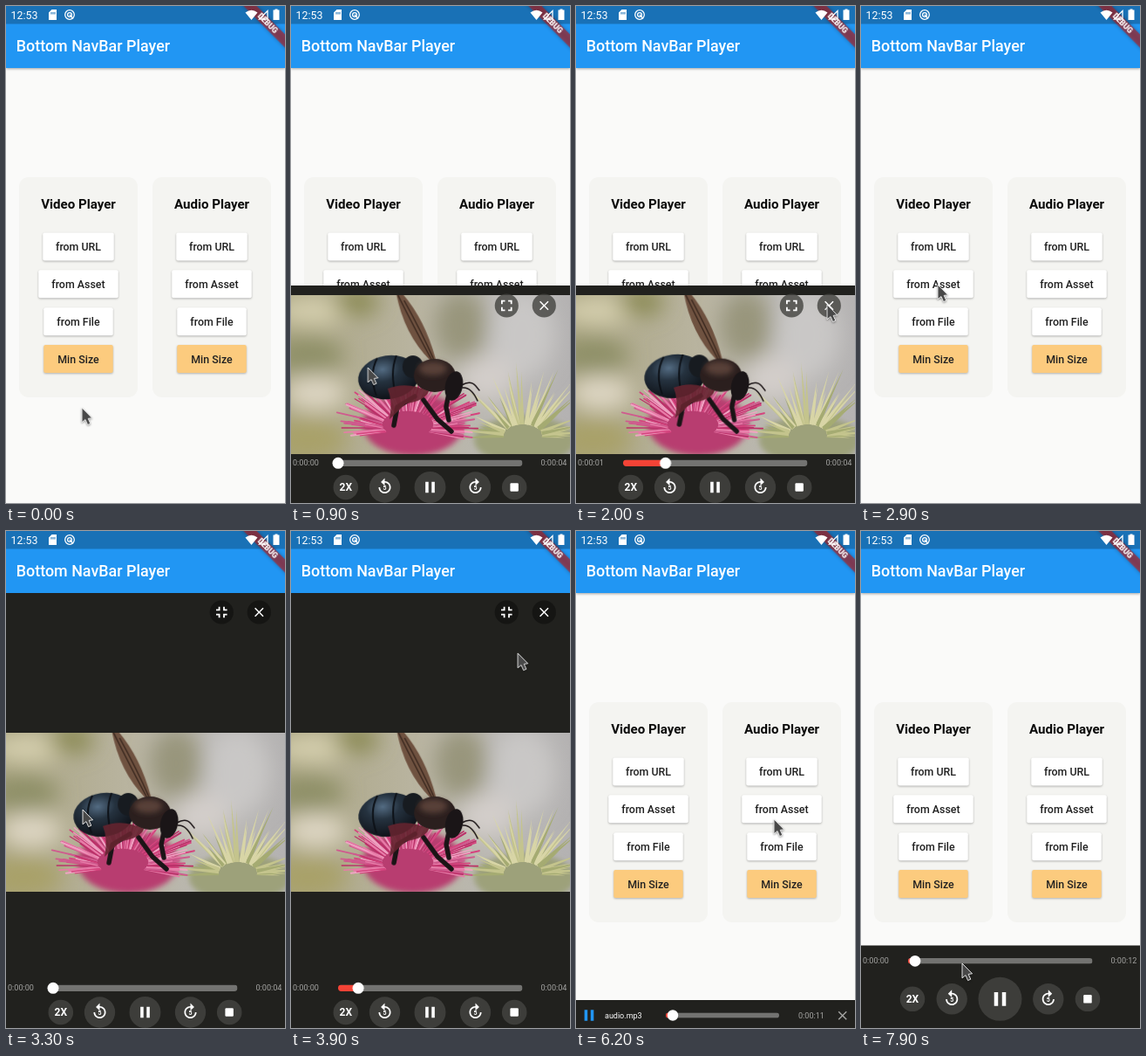
An HTML page for the animation above (8 s loop, 320x569 px).

```html
<!DOCTYPE html>
<html lang="en">
<head>
<meta charset="utf-8">
<title>Bottom NavBar Player</title>
<style>
html, body { margin: 0; width: 100%; height: 100%; overflow: hidden; background: #fafaf9; }
svg { display: block; width: 100vw; height: 100vh; font-family: Roboto, sans-serif; }
.mid { text-anchor: middle; }
.label { font-size: 12.4px; font-weight: 500; fill: #212121; }
.head { font-size: 15.1px; font-weight: 700; fill: #0a0a0a; }
.time { font-size: 9.1px; fill: #a3a3a1; }
.btn { filter: drop-shadow(0 1.3px 1px rgba(0,0,0,.28)); }
.bar { filter: drop-shadow(0 1.8px 1.8px rgba(0,0,0,.35)); }

/* one cycle is 8 s: 1.25% = 100 ms */
.show { visibility: hidden; animation: 8s step-end infinite; }
.small { animation-name: small; }
.full { animation-name: full; }
.video { animation-name: video; }
.mini { animation-name: mini; }
.audio { animation-name: audio; }
.first { animation-name: first; }
.second { animation-name: second; }
.eleven { animation-name: eleven; }
.ten { animation-name: ten; }
@keyframes small { 0% { visibility: hidden } 11.25% { visibility: visible } 30%, 100% { visibility: hidden } }
@keyframes full { 0% { visibility: hidden } 41.25% { visibility: visible } 55%, 100% { visibility: hidden } }
@keyframes video { 0%, 30% { visibility: hidden } 11.25%, 41.25% { visibility: visible } 55%, 100% { visibility: hidden } }
@keyframes mini { 0% { visibility: hidden } 68.75% { visibility: visible } 91.25%, 100% { visibility: hidden } }
@keyframes audio { 0% { visibility: hidden } 91.25%, 100% { visibility: visible } }
@keyframes first { 0%, 30% { visibility: hidden } 11.25%, 41.25% { visibility: visible } 25%, 55%, 100% { visibility: hidden } }
@keyframes second { 0% { visibility: hidden } 25% { visibility: visible } 30%, 100% { visibility: hidden } }
@keyframes eleven { 0% { visibility: hidden } 68.75% { visibility: visible } 82.5%, 100% { visibility: hidden } }
@keyframes ten { 0% { visibility: hidden } 82.5% { visibility: visible } 91.25%, 100% { visibility: hidden } }

.place { animation: place 8s step-end infinite; }
@keyframes place { 0%, 100% { transform: translate(0, 331px) } 36% { transform: translate(0, 231px) } }

.go { animation: 8s linear infinite; }
.goVideo { animation-name: goVideo; }
.goMini { animation-name: goMini; }
.goAudio { animation-name: goAudio; }
@keyframes goVideo {
  0%, 12.625%, 36%, 42.875%, 60%, 100% { transform: translateX(0) }
  30% { transform: translateX(68.2px) }
  30.1% { transform: translateX(0) }
  55% { transform: translateX(47.6px) }
  55.1% { transform: translateX(0) }
}
@keyframes goMini { 0%, 68.125% { transform: translateX(0) } 91.25%, 100% { transform: translateX(19.7px) } }
@keyframes goAudio { 0%, 93% { transform: translateX(0) } 100% { transform: translateX(9.7px) } }

.tap { opacity: 0; animation: 8s linear infinite; }
.tap00 { animation-name: tapA; }
.tap01 { animation-name: tapB; }
.tap10 { animation-name: tapC; }
.tap11 { animation-name: tapD; }
@keyframes tapA { 0%, 5.1% { opacity: 0 } 7.5% { opacity: .1 } 12%, 100% { opacity: 0 } }
@keyframes tapB { 0%, 36.5% { opacity: 0 } 39% { opacity: .1 } 42%, 100% { opacity: 0 } }
@keyframes tapC { 0%, 62.6% { opacity: 0 } 65.5% { opacity: .1 } 70%, 100% { opacity: 0 } }
@keyframes tapD { 0%, 86.1% { opacity: 0 } 88.5% { opacity: .1 } 92%, 100% { opacity: 0 } }

.bee { transform-origin: 150px 110px; animation: sway 1.6s ease-in-out infinite; }
@keyframes sway { 0%, 50%, 100% { transform: rotate(0) } 25% { transform: translate(1px, -.6px) rotate(.8deg) } 75% { transform: translate(-1px, .6px) rotate(-.8deg) } }

.cursor { animation: cursor 8s linear infinite; }
@keyframes cursor {
  0% { transform: translate(87px, 460px) }
  1.25% { transform: translate(91px, 446px) }
  3.75%, 11.25% { transform: translate(88px, 414px) }
  18.75% { transform: translate(237px, 381px) }
  23%, 29.5% { transform: translate(288px, 342px) }
  33.75%, 35% { transform: translate(92px, 328px) }
  36.25%, 42% { transform: translate(88px, 319px) }
  48.75% { transform: translate(260px, 140px) }
  52%, 55% { transform: translate(288px, 92px) }
  57.5% { transform: translate(272px, 178px) }
  61.25%, 72.5% { transform: translate(227px, 408px) }
  77.5% { transform: translate(227px, 330px) }
  80%, 91.25% { transform: translate(229px, 312px) }
  96.25% { transform: translate(178px, 444px) }
  98.75%, 100% { transform: translate(116px, 495px) }
}
</style>
</head>
<body>
<svg viewBox="0 0 320 569" preserveAspectRatio="none">
  <defs>
    <filter id="soft" x="-50%" y="-50%" width="200%" height="200%"><feGaussianBlur stdDeviation="12"/></filter>
    <filter id="blur" x="-50%" y="-50%" width="200%" height="200%"><feGaussianBlur stdDeviation="3"/></filter>
    <linearGradient id="air">
      <stop offset="0" stop-color="#aaa583"/><stop offset=".45" stop-color="#b9b4a0"/><stop offset=".75" stop-color="#bab8b5"/><stop offset="1" stop-color="#b4b2b2"/>
    </linearGradient>
    <radialGradient id="shell" cx=".42" cy=".3" r=".7">
      <stop offset="0" stop-color="#536b82"/><stop offset=".4" stop-color="#25323f"/><stop offset="1" stop-color="#0e1117"/>
    </radialGradient>
    <clipPath id="screen"><rect width="320" height="181.5"/></clipPath>
  </defs>

  <rect width="320" height="569" fill="#fafaf9"/>
  <g id="cards"></g>

  <g class="bar"><rect width="320" height="71" fill="#2196f3"/></g>
  <rect width="320" height="20.5" fill="#1971b6"/>
  <text x="11.8" y="52.4" font-size="17.9" font-weight="500" fill="#fff">Bottom NavBar Player</text>

  <rect class="show small" y="320" width="320" height="249" fill="#21211e"/>
  <rect class="show full" y="71" width="320" height="498" fill="#21211e"/>

  <g class="show video"><g class="place"><g clip-path="url(#screen)">
    <rect width="320" height="182" fill="url(#air)"/>
    <g filter="url(#soft)">
      <ellipse cx="25" cy="18" rx="45" ry="16" fill="#d5cfae"/>
      <ellipse cx="75" cy="8" rx="26" ry="16" fill="#8b8a55"/>
      <ellipse cx="20" cy="70" rx="40" ry="22" fill="#8f9068"/>
      <ellipse cx="28" cy="112" rx="36" ry="20" fill="#ddd5c2"/>
      <ellipse cx="20" cy="165" rx="45" ry="24" fill="#a9a169"/>
      <ellipse cx="195" cy="35" rx="30" ry="40" fill="#98957b"/>
      <ellipse cx="265" cy="45" rx="38" ry="50" fill="#c9c7c6"/>
      <ellipse cx="225" cy="95" rx="32" ry="26" fill="#d3ceca"/>
    </g>
    <ellipse cx="268" cy="166" rx="58" ry="28" fill="#9da17a" filter="url(#blur)"/>
    <g id="spikes"></g>
    <ellipse cx="140" cy="148" rx="58" ry="36" fill="#b83c70" filter="url(#blur)"/>
    <g id="petals" stroke-linecap="round"></g>
    <g class="bee">
      <path d="M160 75Q130 45 121 -2L128 -2Q154 28 166 73Z" fill="#6f5240"/>
      <path d="M162 75Q143 40 123 0M164 74Q150 42 130 6" fill="none" stroke="#38261d" stroke-width="1.4"/>
      <g fill="none" stroke="#1b1416" stroke-linejoin="round" stroke-linecap="round">
        <path d="M142 116L122 128L118 149M152 120L168 142L184 156M181 113L178 128L181 143" stroke-width="5.5"/>
        <path d="M196 103Q206 97 212 104L216 109M197 106Q207 105 214 121" stroke-width="1.5"/>
      </g>
      <ellipse cx="112" cy="94" rx="35" ry="25" fill="url(#shell)" transform="rotate(-8 112 94)"/>
      <path d="M99 72Q89 91 98 115M121 69Q113 90 121 116" fill="none" stroke="#0d1117" stroke-width="2"/>
      <ellipse cx="140" cy="82" rx="12" ry="13" fill="#171b20"/>
      <ellipse cx="165" cy="92" rx="24" ry="19" fill="#2b1f1e"/>
      <ellipse cx="163" cy="84" rx="16" ry="8" fill="#594139" filter="url(#blur)"/>
      <ellipse cx="187" cy="104" rx="10" ry="17" fill="#1a1517" transform="rotate(12 187 104)"/>
      <path d="M111 107Q133 98 158 110Q154 121 132 124L113 142Q117 121 111 107Z" fill="#64242f" opacity=".9"/>
    </g>
  </g></g></g>

  <g id="ui"></g>

  <g transform="translate(320 0) rotate(45)">
    <rect x="-60" y="22.9" width="120" height="10.7" fill="#b71c1c" fill-opacity=".63" style="filter:drop-shadow(0 0 2px rgba(0,0,0,.45))"/>
    <text class="mid" y="31.4" font-size="8.8" font-weight="900" fill="#fff">DEBUG</text>
  </g>

  <text x="5.5" y="14.7" font-size="12.4" fill="#fff">12:53</text>
  <g fill="#fff">
    <path d="M52.5 4H58v12h-9V7.5ZM51.5 7v2.5h1V7Zm2 0v2.5h1V7Zm2 0v2.5h1V7Z" fill-rule="evenodd"/>
    <path d="M274.5 7.5Q281.5 2 288.5 7.5L281.5 16Z"/>
    <path d="M308.5 4.5V3.5h3v1H313.5V16H306.5V4.5Z"/>
  </g>
  <g fill="none" stroke="#fff" stroke-width="1.3">
    <circle cx="73" cy="10" r="5.3"/><circle cx="73" cy="10" r="2.4"/><path d="M73 10l4 4.5"/>
    <path d="M290.5 15H300V5.5Z"/>
  </g>

  <g class="cursor">
    <path d="M0 0V16.8L4 13.6L6.6 19.6L9.8 18.2L7.2 12.4L11.6 11.8Z" fill="#484848" stroke="#f4f4f4" stroke-width=".9" style="filter:drop-shadow(.5px 1px .8px rgba(0,0,0,.4))"/>
  </g>
</svg>
<script>
const put = (id, html) => { document.getElementById(id).innerHTML = html; };
const list = (n, fn) => Array.from({ length: n }, (_, i) => fn(i)).join('');

let seed = 11;
const rand = () => (seed = (seed * 16807) % 2147483647) / 2147483647;

// home screen cards
const buttons = [['from URL', 81.5], ['from Asset', 91.5], ['from File', 79.5], ['Min Size', 79.5]];
const taps = ['', 1, '', 0];
const card = (cx, name, side) => `
  <rect x="${cx - 68}" y="196" width="136" height="252" rx="11" fill="#f4f4f1"/>
  <text class="mid head" x="${cx}" y="232.3">${name}</text>` +
  buttons.map(([label, w], i) => {
    const y = 259.4 + i * 42.9;
    const box = `x="${cx - w / 2}" y="${y}" width="${w}" height="32" rx="2"`;
    const tap = taps[i] === '' ? '' : `<rect class="tap tap${side}${taps[i]}" ${box}/>`;
    return `<g class="btn"><rect ${box} fill="${i == 3 ? '#fccb7e' : '#fff'}"/></g>${tap}
      <text class="mid label" x="${cx}" y="${y + 20.4}">${label}</text>`;
  }).join('');
put('cards', card(83, 'Video Player', 0) + card(236, 'Audio Player', 1));

// flower and thistle
const pinks = ['#d5447e', '#e87ba8', '#bc3069', '#f0a3c3', '#cf5b8e'];
put('petals', list(130, i => {
  const a = Math.PI * (0.82 + 1.36 * rand()), r = 0.6 + 0.4 * rand();
  const x = 134 + 83 * r * Math.cos(a), y = 140 + 50 * r * Math.sin(a);
  return `<path d="M${134 + 30 * Math.cos(a)} ${148 + 16 * Math.sin(a)}L${x} ${y}" stroke="${pinks[i % 5]}" stroke-width="${1.2 + rand()}"/>`;
}));
put('spikes', list(46, i => {
  const a = Math.PI * (0.95 + 1.1 * rand()), r = 45 + 42 * rand();
  const c = Math.cos(a), s = Math.sin(a), x = 266 + 22 * c, y = 160 + 12 * s;
  return `<path d="M${x - 2.2 * s} ${y + 2.2 * c}L${266 + r * c} ${160 + r * s}L${x + 2.2 * s} ${y - 2.2 * c}Z" fill="${['#d8d5a6', '#a5ab72', '#c4c48d'][i % 3]}"/>`;
}));

// player controls
const icons = {
  close: 'M19 6.41L17.59 5 12 10.59 6.41 5 5 6.41 10.59 12 5 17.59 6.41 19 12 13.41 17.59 19 19 17.59 13.41 12z',
  grow: 'M7 14H5v5h5v-2H7v-3zm-2-4h2V7h3V5H5v5zm12 7h-3v2h5v-5h-2v3zM14 5v2h3v3h2V5h-5z',
  shrink: 'M5 16h3v3h2v-5H5v2zm3-8H5v2h5V5H8v3zm6 11h2v-3h3v-2h-5v5zm2-11V5h-2v5h5V8h-3z',
  pause: 'M6 19h4V5H6zm8-14v14h4V5z',
  replay: 'M12 5V1L7 6l5 5V7c3.31 0 6 2.69 6 6s-2.69 6-6 6-6-2.69-6-6H4c0 4.42 3.58 8 8 8s8-3.58 8-8-3.58-8-8-8z'
};
const icon = (name, x, y, k, fill = '#fff', flip = 1) =>
  `<path transform="translate(${x} ${y}) scale(${k * flip} ${k}) translate(-12 -12)" d="${icons[name]}" fill="${fill}"/>`;
const disc = (x, y, r, fill = '#3d3d3a') => `<circle cx="${x}" cy="${y}" r="${r}" fill="${fill}"/>`;
const time = (x, y, s) => `<text class="time" x="${x}" y="${y}">${s}</text>`;

const slider = (id, x, y, w, h, r) => `
  <clipPath id="${id}"><rect x="${x}" y="${y - h / 2}" width="${w}" height="${h}" rx="${h / 2}"/></clipPath>
  <g clip-path="url(#${id})"><rect x="${x}" y="${y - h / 2}" width="${w}" height="${h}" fill="#737371"/>
  <rect class="go ${id}" x="${x - w}" y="${y - h / 2}" width="${w}" height="${h}" fill="#f44336"/></g>
  <circle class="go ${id}" cx="${x}" cy="${y}" r="${r}" fill="#fff"/>`;

const skip = (x, y, flip) => disc(x, y, 17.7) + icon('replay', x, y - .8, .88, '#fff', flip) +
  `<text class="mid" x="${x}" y="${y + 2.7}" font-size="7" font-weight="700" fill="#fff">5</text>`;
const controls = (y, gap, edge, r, k) =>
  disc(159.5 - edge, y, 14.3) +
  `<text class="mid" x="${159.5 - edge}" y="${y + 4.3}" font-size="12" font-weight="700" fill="#fff">2X</text>` +
  skip(159.5 - gap, y, 1) + disc(159.5, y, r) + icon('pause', 159.5, y, k) + skip(159.5 + gap, y, -1) +
  disc(159.5 + edge, y, 14.3) +
  `<rect x="${154.7 + edge}" y="${y - 4.7}" width="9.5" height="9.5" rx="1.2" fill="#fff"/>`;

const corner = (y, name, fill) => disc(247.3, y, 13.6, fill) + icon(name, 247.3, y, .9) +
  disc(290.3, y, 13.6, fill) + icon('close', 290.3, y, .75);

put('ui', `
  <g class="show small">${corner(343, 'grow', 'rgba(66,66,62,.8)')}</g>
  <g class="show full">${corner(93, 'shrink', '#151513')}</g>
  <g class="show video">
    ${slider('goVideo', 54, 523.3, 211.5, 7.4, 6.5)}
    ${time(286.5, 526.3, '0:00:04')}${controls(551, 52, 96.7, 18, .89)}
  </g>
  <g class="show first">${time(2, 526.3, '0:00:00')}</g>
  <g class="show second">${time(2, 526.3, '0:00:01')}</g>
  <g class="show mini">
    <rect y="537" width="320" height="32" fill="#21211e"/>
    ${icon('pause', 15, 554.5, .89, '#2196f3')}
    <text x="33" y="557.7" font-size="9" fill="#fff">audio.mp3</text>
    ${slider('goMini', 103, 554.5, 130, 6.2, 6.2)}
    ${icon('close', 305.7, 554.7, .72, '#a3a3a1')}
  </g>
  <g class="show eleven">${time(255, 557.8, '0:00:11')}</g>
  <g class="show ten">${time(255, 557.8, '0:00:10')}</g>
  <g class="show audio">
    <rect y="474.5" width="320" height="95" fill="#21211e"/>
    ${slider('goAudio', 54, 492.3, 211.5, 6.6, 6.4)}
    ${time(2, 495.4, '0:00:00')}${time(286.5, 495.4, '0:00:12')}${controls(535.8, 55.3, 100.5, 25, 1.13)}
  </g>`);
</script>
</body>
</html>
```
